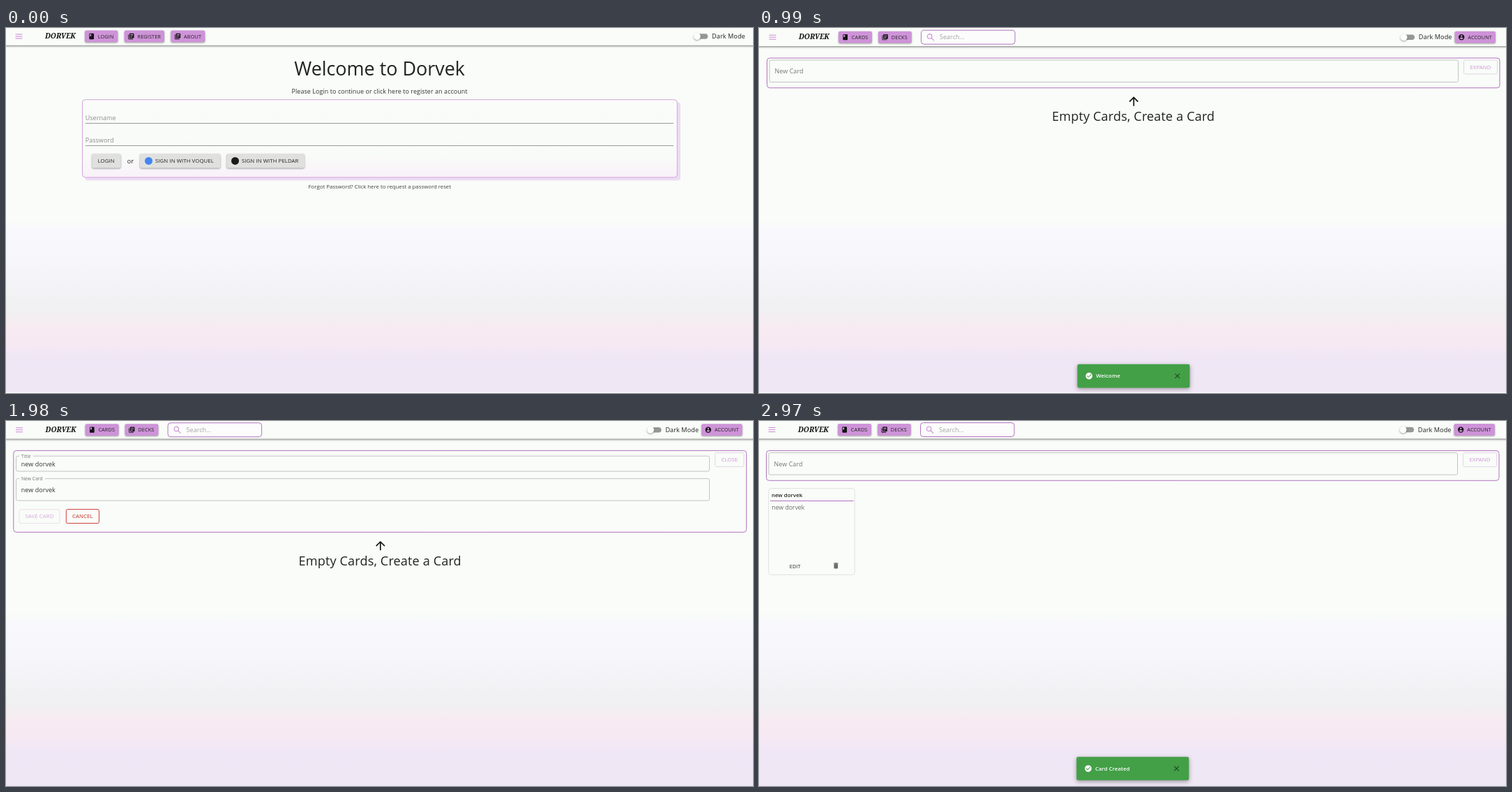
Write an HTML page that moves like this. It is 1071 px wide and 523 px high and loops after 3.96 s.

```html
<!DOCTYPE html>
<html lang="en">
<head>
<meta charset="utf-8">
<title>Card app tour</title>
<style>
  html, body { margin: 0; width: 100%; height: 100%; overflow: hidden; background: #fff; }
  svg { display: block; width: 1071px; height: 523px; }
  text { font-family: "Open Sans", "Noto Sans", sans-serif; white-space: pre; }
  .scene { opacity: 0; }
  .raised { filter: drop-shadow(0 1px 1px rgba(0,0,0,.38)); }
  .bar { filter: drop-shadow(0 1.2px 1.6px rgba(0,0,0,.55)); }
  .toast { filter: drop-shadow(0 2px 3px rgba(0,0,0,.36)); }
  .brand { font: italic 800 10.2px "Noto Serif", serif; }
</style>
</head>
<body>
<svg id="stage" viewBox="0 0 1071 523">
  <defs>
    <linearGradient id="page" x1="0" y1="0" x2="0" y2="1">
      <stop offset="0" stop-color="#f9fcf8"/>
      <stop offset=".525" stop-color="#f9fcf8"/>
      <stop offset=".555" stop-color="#f9f8fd"/>
      <stop offset=".64" stop-color="#f7f6fb"/>
      <stop offset=".77" stop-color="#f0f0f2"/>
      <stop offset=".83" stop-color="#f8eaf1"/>
      <stop offset=".86" stop-color="#f7e9f2"/>
      <stop offset=".9" stop-color="#f0e7f6"/>
      <stop offset="1" stop-color="#f0e7f5"/>
    </linearGradient>
    <linearGradient id="form" x1="0" y1="0" x2="0" y2="1">
      <stop offset="0" stop-color="#f9fcf8"/>
      <stop offset=".72" stop-color="#f9fbf9"/>
      <stop offset="1" stop-color="#f9f1f8"/>
    </linearGradient>
  </defs>
  <rect width="1071" height="523" fill="url(#page)"/>
</svg>
<script>
const HOLD = 990, COUNT = 4;
const LILAC = '#ce93d8', PURPLE = '#b273c0', INK = '#222', PAPER = '#f9fcf8';

const ICONS = {
  book: 'M18 2H6c-1.1 0-2 .9-2 2v16c0 1.1.9 2 2 2h12c1.1 0 2-.9 2-2V4c0-1.1-.9-2-2-2zM6 4h5v8l-2.5-1.5L6 12z',
  stack: 'M4 6H2v14c0 1.1.9 2 2 2h14v-2H4zM20 2H8c-1.1 0-2 .9-2 2v12c0 1.1.9 2 2 2h12c1.1 0 2-.9 2-2V4c0-1.1-.9-2-2-2zm-1 9H9V9h10zm-4 4H9v-2h6zm4-8H9V5h10z',
  arrow: 'M4 12l1.4 1.4L11 7.8V20h2V7.8l5.6 5.6L20 12l-8-8z',
  trash: 'M6 19c0 1.1.9 2 2 2h8c1.1 0 2-.9 2-2V7H6zM19 4h-3.5l-1-1h-5l-1 1H5v2h14z',
  cross: 'M19 6.4L17.6 5 12 10.6 6.4 5 5 6.4 10.6 12 5 17.6 6.4 19 12 13.4 17.6 19 19 17.6 13.4 12z',
  check: 'M12 2a10 10 0 1 0 0 20 10 10 0 0 0 0-20zm-2 15l-5-5 1.4-1.4 3.6 3.6 7.6-7.6L19 8z',
  person: 'M12 2a10 10 0 1 0 0 20 10 10 0 0 0 0-20zm0 3a3 3 0 1 1 0 6 3 3 0 0 1 0-6zm0 14.2a7.2 7.2 0 0 1-6-3.2c0-2 4-3.1 6-3.1s6 1.1 6 3.1a7.2 7.2 0 0 1-6 3.2z'
};

const shift = (x, y, body) => `<g transform="translate(${x} ${y})">${body}</g>`;

const icon = (name, cx, cy, size, fill = '#111') =>
  `<path d="${ICONS[name]}" fill="${fill}" fill-rule="evenodd" transform="translate(${cx} ${cy}) scale(${size / 24}) translate(-12 -12)"/>`;

const text = (str, x, y, { size = 8.93, fill = INK, ls = .00938, weight = 400, anchor = 'start' } = {}) =>
  `<text x="${x}" y="${y}" font-size="${size}" fill="${fill}" font-weight="${weight}" text-anchor="${anchor}" letter-spacing="${(ls * size).toFixed(3)}">${str}</text>`;

const box = (x, y, x2, y2, { fill = 'none', stroke = 'none', r = 2.2, cls = '' } = {}) =>
  `<rect x="${x}" y="${y}" width="${x2 - x}" height="${y2 - y}" rx="${r}" fill="${fill}" stroke="${stroke}" class="${cls}"/>`;

const rule = (x, x2, y, stroke, w = 1) => `<path d="M${x} ${y}H${x2}" stroke="${stroke}" stroke-width="${w}"/>`;

const dot = (cx, cy, r, fill, cls = '') => `<circle cx="${cx}" cy="${cy}" r="${r}" fill="${fill}" class="${cls}"/>`;

const navButton = (label, x, x2, name) =>
  box(x, 4, x2, 20.7, { fill: LILAC, cls: 'raised' }) + icon(name, x + 9.7, 12.5, 10) +
  text(label, x + 18.8, 15.1, { size: 7.25, ls: .02 });

const outlined = (label, x, y, x2, stroke, fill) =>
  box(x, y, x2, y + 20, { stroke }) +
  text(label, (x + x2) / 2, y + 12.8, { size: 7.81, ls: .01, fill, anchor: 'middle' });

const greyButton = (label, x, x2, tx) =>
  box(x, 180.3, x2, 200.4, { fill: '#e0e1df', cls: 'raised' }) +
  text(label, tx, 193.2, { size: 7.81, ls: .01 });

const toggle = x =>
  box(x, 8.7, x + 18, 16.3, { fill: '#959695', r: 3.8 }) + dot(x + 2.5, 12.5, 5, '#fdfdfd', 'raised') +
  text('Dark Mode', x + 23.8, 15.8, { size: 9.1 });

const header = inner =>
  `<rect x="-5" y="-5" width="1082" height="30.3" fill="${PAPER}" class="bar"/>` +
  [9.5, 12.5, 15.5].map(y => rule(13.5, 23.5, y, LILAC, 1.1)).join('') +
  '<text class="brand" x="56" y="15.6" fill="#111">DORVEK</text>' + inner;

const guestHeader = header(
  navButton('LOGIN', 113, 160.3, 'book') + navButton('REGISTER', 169.7, 227, 'stack') +
  navButton('ABOUT', 236.3, 285.3, 'stack') + toggle(988.3));

const userHeader = header(
  navButton('CARDS', 113, 161, 'book') + navButton('DECKS', 170, 217.8, 'stack') +
  box(231.5, 2.5, 366, 22.5, { stroke: PURPLE, fill: '#fbfcfb', r: 4 }) +
  `<g fill="none" stroke="${LILAC}" stroke-width="1.2"><circle cx="243.7" cy="11.2" r="3.2"/><path d="M246 13.5l4 4"/></g>` +
  text('Search...', 258, 15.7, { fill: '#a3a4a3' }) + toggle(921) +
  navButton('ACCOUNT', 996.5, 1055, 'person'));

const closedEditor =
  box(10.5, 42.5, 1061, 85.3, { stroke: PURPLE, r: 4 }) +
  box(14, 45.5, 1001.5, 77, { stroke: '#c2c4c2' }) +
  text('New Card', 21.5, 64.6, { fill: '#777' }) +
  outlined('EXPAND', 1009.5, 45.5, 1057.5, '#e6d3ea', LILAC);

const field = (label, value, y, y2, gapEnd) =>
  box(14.5, y, 1008.5, y2, { stroke: '#c2c4c2' }) + rule(19.5, gapEnd, y, PAPER, 2) +
  text(label, 22, y + 2.6, { size: 6.7, fill: '#777' }) +
  text(value, 21.8, (y + y2) / 2 + 3.4, { fill: '#333' });

const openEditor =
  box(10.8, 42.4, 1061.6, 159.3, { stroke: PURPLE, r: 4 }) +
  field('Title', 'new dorvek', 50.2, 72, 39) + field('New Card', 'new dorvek', 82.6, 114, 56) +
  outlined('CLOSE', 1016.7, 45.4, 1058, '#e6d3ea', LILAC) +
  outlined('SAVE CARD', 19, 126.6, 77, '#efdcf2', '#d6a5de') +
  outlined('CANCEL', 86.3, 126.6, 133.4, '#cf3a3a', '#c62828');

const emptyHint = (cx, y) =>
  icon('arrow', cx + .6, y, 20.1) +
  text('Empty Cards, Create a Card', cx, y + 28.3, { size: 18.1, ls: .00735, anchor: 'middle' });

const toast = msg =>
  box(455.2, 481.2, 616.4, 514.8, { fill: '#43a047', cls: 'toast' }) + icon('check', 472, 498, 11.6, '#fff') +
  text(msg, 482, 500.7, { size: 7.81, ls: .005, weight: 600, fill: '#fff' }) +
  icon('cross', 598.6, 498, 12.6, '#1d4420');

const bottomEdge = '<rect y="522" width="1071" height="1" fill="#fff"/>';

const login = shift(0, -.5, guestHeader) +
  text('Welcome to Dorvek', 535.6, 68.2, { size: 26.9, ls: 0, anchor: 'middle' }) +
  text('Please Login to continue or click here to register an account', 535.6, 93.6, { anchor: 'middle', fill: '#333' }) +
  box(113.5, 106.5, 967, 218.5, { fill: '#ecdcf4', r: 4 }) +
  box(109.5, 102.7, 962.3, 214, { fill: 'url(#form)', stroke: '#d6a3de', r: 4 }) +
  text('Username', 113.7, 131.8, { fill: '#8c8d8c' }) + rule(114, 957, 136.6, '#979897') +
  text('Password', 113.7, 163.8, { fill: '#8c8d8c' }) + rule(114, 957, 168.6, '#979897') +
  greyButton('LOGIN', 123.3, 164.5, 131.6) + text('or', 173.8, 193.6, { size: 9 }) +
  greyButton('SIGN IN WITH VOQUEL', 192, 307.3, 214) + dot(204.5, 190.4, 5.5, '#4285f4') +
  greyButton('SIGN IN WITH PELDAR', 316.4, 428, 338) + dot(328.5, 190.4, 5.5, '#1b1b1b') +
  text('Forgot Password? Click here to request a password reset', 535.8, 230.2, { size: 7.81, ls: 0, anchor: 'middle', fill: '#444' }) +
  bottomEdge;

const welcome = shift(1, .7, userHeader) + shift(1, .5, closedEditor) +
  emptyHint(536.7, 105) + shift(1.2, .6, toast('Welcome')) + bottomEdge;

const editing = shift(.6, .2, userHeader) + openEditor + emptyHint(536.2, 178.6);

const created = userHeader + closedEditor +
  box(13.6, 96.6, 137.2, 220.3, { stroke: '#e0e2e0', r: 4 }) +
  text('new dorvek', 18, 109.1, { size: 7.81, ls: .005, weight: 600 }) +
  rule(16, 135.6, 114.5, PURPLE) +
  text('new dorvek', 18.3, 127.3, { weight: 300 }) +
  text('EDIT', 43.8, 211.1, { size: 7.25, ls: .02 }) +
  icon('trash', 110.3, 207.2, 11.2, '#6c6d6c') + toast('Card Created');

const stage = document.getElementById('stage');
[login, welcome, editing, created].forEach((body, i) => {
  const g = document.createElementNS('http://www.w3.org/2000/svg', 'g');
  g.setAttribute('class', 'scene');
  g.innerHTML = body;
  stage.append(g);
  g.animate([
    { opacity: 1, offset: 0, easing: 'step-end' },
    { opacity: 0, offset: 1 / COUNT, easing: 'step-end' },
    { opacity: 0, offset: 1 }
  ], { duration: HOLD * COUNT, delay: i * HOLD, iterations: Infinity });
});
</script>
</body>
</html>
```
